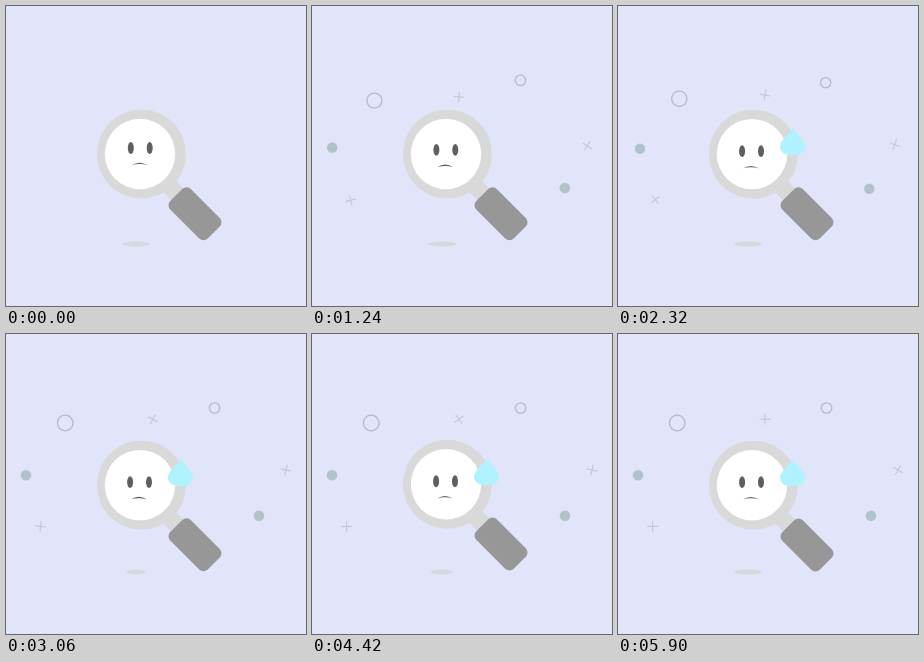
An HTML page that plays this animation: 300 px wide and 300 px high, repeating every 5.92 s.

```html
<!DOCTYPE html>
<html lang="en">
<head>
<meta charset="utf-8">
<title>Nothing found</title>
<style>
  html, body { margin: 0; width: 100%; height: 100%; overflow: hidden; background: #e2e5fa; }
  svg { display: block; width: 100%; height: 100%; }
  .line { fill: none; stroke: #b6b9ca; stroke-width: 1.3; }
  .cross { fill: none; stroke: #c6c8d3; stroke-width: 1.2; }
  .dot { fill: #b0c2ca; }
</style>
</head>
<body>
<svg viewBox="0 0 300 300">
  <g id="early">
    <circle class="dot" cx="20" cy="141.2" r="5.3"/>
    <circle class="dot" cx="253" cy="181.8" r="5.3"/>
    <circle class="line" cx="208.6" cy="74" r="5.2"/>
  </g>
  <g id="late">
    <circle class="line" cx="59.2" cy="89" r="7.8"/>
    <path class="cross" id="topCross" d="M-5.5 0H5.5M0-5.5V5.5"/>
    <path class="cross" id="leftCross" d="M-5.5 0H5.5M0-5.5V5.5"/>
    <path class="cross" id="rightCross" d="M-5.5 0H5.5M0-5.5V5.5"/>
  </g>
  <ellipse id="shadow" cx="130" cy="238" rx="14" ry="2.4" fill="#d7d8dd"/>
  <g id="glass">
    <rect x="-14" y="-8.5" width="30" height="17" fill="#d9d9d9" transform="translate(166 183) rotate(45)"/>
    <rect x="-26.5" y="-14.5" width="53" height="29" rx="6" fill="#979797" transform="translate(189 207.7) rotate(45)"/>
    <circle cx="135.4" cy="148" r="44.5" fill="#d9d9d9"/>
    <circle cx="134" cy="148" r="35.2" fill="#fff"/>
    <g id="face" fill="#5f5f61">
      <ellipse cx="124.8" cy="142" rx="3" ry="5.9"/>
      <ellipse cx="143.7" cy="142" rx="3" ry="5.9"/>
      <path d="M125.6 159.3Q133.6 154.2 141.8 159.3Q133.6 156.9 125.6 159.3Z"/>
    </g>
    <path id="drop" fill="#b0f2ff" d="M175 121.5C178 128 187 133 187 141C187 146.500 181 149 174.500 149C168 149 162 146.500 162 141C162 133 172 128 175 121.500Z"/>
  </g>
</svg>
<script>
  const LOOP = 5920, BOB = 1200, BOB_END = 5400;
  const ORIGIN = [147, 243];

  // Scale of the scattered marks, which burst out of ORIGIN and settle
  const earlyKeys = [[0, 0], [970, 1.115], [1300, .987], [1750, .972], [3000, 1]];
  const lateKeys = [[264, 0], [825, 1.11], [1300, .957], [1650, .952], [3000, 1]];
  const topSpin = [[780, 0], [1240, 5], [2320, 10], [3820, 45], [5020, 62], [LOOP, 90]];
  const rightSpin = [[780, 30], [1240, 32], [2320, 20], [3820, 5], [5020, 20], [LOOP, 30]];

  const el = id => document.getElementById(id);
  const place = (id, value) => el(id).setAttribute('transform', value);
  const smooth = x => x * x * (3 - 2 * x);
  const linear = x => x;
  const ramp = (t, from, to) => smooth(Math.min(1, Math.max(0, (t - from) / (to - from))));

  function track(keys, t, ease = smooth) {
    if (t <= keys[0][0]) return keys[0][1];
    for (let i = 1; i < keys.length; i++) {
      const [t0, v0] = keys[i - 1], [t1, v1] = keys[i];
      if (t < t1) return v0 + (v1 - v0) * ease((t - t0) / (t1 - t0));
    }
    return keys[keys.length - 1][1];
  }

  function burst(id, scale) {
    const [x, y] = ORIGIN;
    place(id, `translate(${x} ${y}) scale(${scale}) translate(${-x} ${-y})`);
  }

  const spin = (id, x, y, angle) => place(id, `translate(${x} ${y}) rotate(${angle})`);
  const wave = t => Math.cos(2 * Math.PI * t / BOB);

  function draw(t) {
    burst('early', track(earlyKeys, t));
    burst('late', track(lateKeys, t));
    spin('topCross', 147, 85.2, track(topSpin, t, linear));
    spin('leftCross', 34.6, 192.4, 360 * t / LOOP);
    spin('rightCross', 280, 136, track(rightSpin, t, linear));

    el('shadow').setAttribute('rx', 12 + 2 * wave(t));
    place('glass', `translate(0 ${1.6 * (1 - wave(Math.min(t, BOB_END)))})`);

    const look = ramp(t, 900, 1500);
    place('face', `translate(${-.7 * look} ${3 * look})`);

    const fall = ramp(t, 1160, 1760);
    place('drop', `translate(0 ${-12 * (1 - fall)})`);
    el('drop').setAttribute('opacity', fall);
  }

  const start = performance.now();
  function tick() {
    draw((performance.now() - start) % LOOP);
    requestAnimationFrame(tick);
  }
  draw(0);
  requestAnimationFrame(tick);
</script>
</body>
</html>
```
